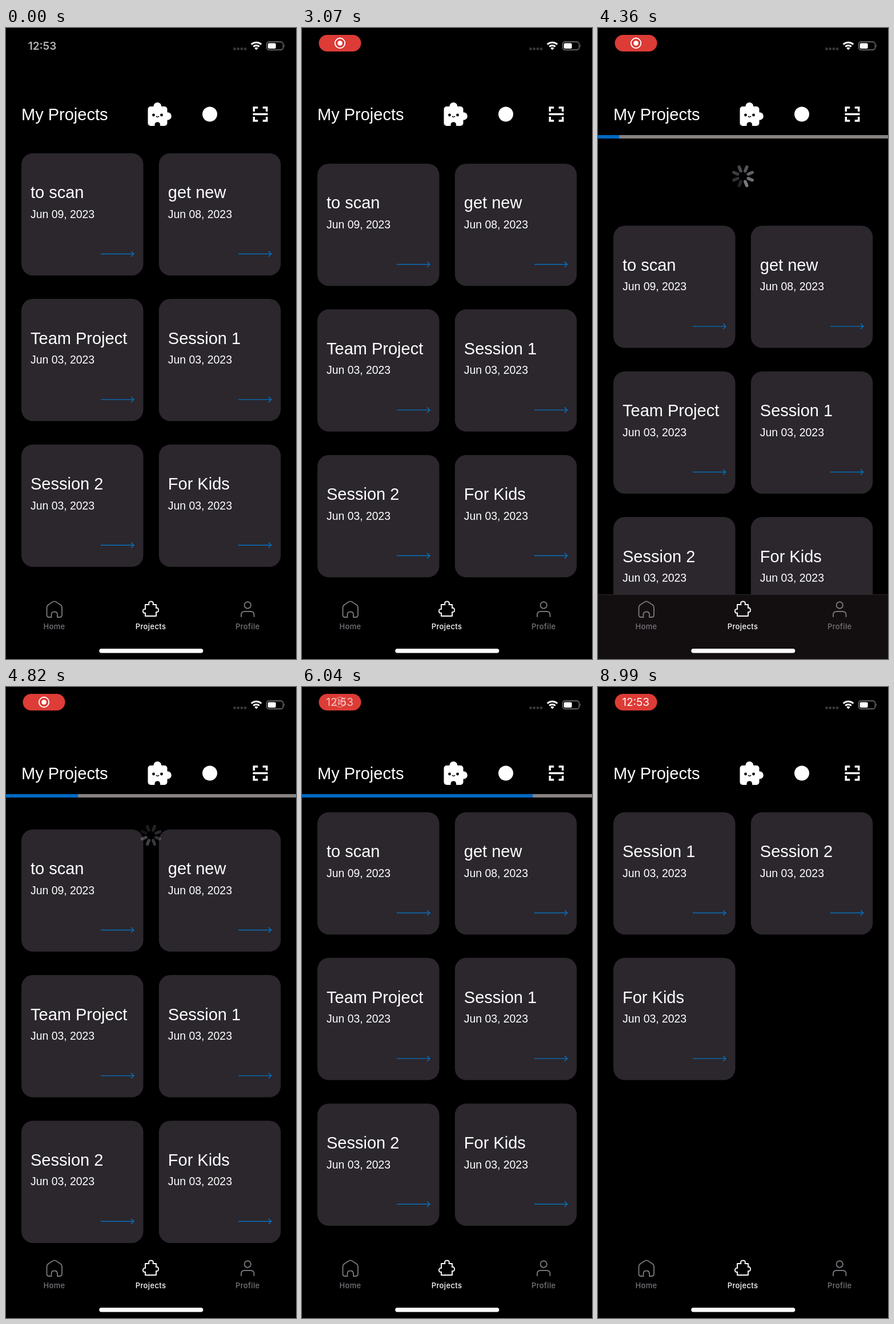
Animation, 508 px wide and 1102 px high, one loop 9.01 s. Source, as an HTML page:

```html
<!DOCTYPE html>
<html lang="en">
<head>
<meta charset="utf-8">
<title>My Projects</title>
<style>
  html, body { margin: 0; width: 100%; height: 100%; overflow: hidden; background: #000; }
  svg { display: block; width: 100%; height: 100%; }
  text { fill: #fff; font-family: "Liberation Sans", Arial, sans-serif; }
  .title { font-size: 29px; }
  .date { font-size: 19.4px; }
  .clock, .tab { font-family: Inter, sans-serif; text-anchor: middle; }
  .clock { font-size: 19px; }
  .tab { font-size: 13px; font-weight: 500; letter-spacing: .35px; }
  .line { fill: none; stroke: #fff; stroke-width: 1.9; stroke-linecap: round; stroke-linejoin: round; }
  .off { stroke: #77757b; }
  text.off { fill: #77757b; stroke: none; }
</style>
</head>
<body>
<svg viewBox="0 0 508 1102">
  <rect width="508" height="1102"/>

  <!-- status bar -->
  <text id="clock" class="clock" x="63.5" y="38" font-weight="600" style="fill:#b5b3b7">12:53</text>
  <g id="pill">
    <rect id="pillBox" x="29.5" y="12" width="74" height="29" rx="14.5"/>
    <g id="record">
      <circle class="line" cx="66.5" cy="26.5" r="8.7"/>
      <circle cx="66.5" cy="26.5" r="4.3" fill="#fff"/>
    </g>
    <text id="pillTime" class="clock" x="66.2" y="33.3">12:53</text>
  </g>
  <g fill="#39373b">
    <circle cx="400.5" cy="36.5" r="2.4"/><circle cx="406.7" cy="36.5" r="2.4"/>
    <circle cx="412.9" cy="36.5" r="2.4"/><circle cx="419.1" cy="36.5" r="2.4"/>
  </g>
  <g fill="none" stroke="#fff" stroke-width="3">
    <path d="M429.7 28.7A13 13 0 0 1 447.3 28.7M433.2 32.5A7.8 7.8 0 0 1 443.8 32.5"/>
    <path d="M438.5 38.5l-3.2-3.4A4.6 4.6 0 0 1 441.7 35.1z" fill="#fff" stroke="none"/>
  </g>
  <rect x="456.5" y="24.2" width="29" height="14" rx="4" fill="none" stroke="#7c7a7e" stroke-width="1.4"/>
  <rect x="458.7" y="26.4" width="14" height="9.6" rx="2" fill="#fff"/>
  <path d="M487 29q2 2 0 4.5z" fill="#7c7a7e"/>

  <!-- header -->
  <text class="title" x="27" y="160.5">My Projects</text>
  <g fill="#fff">
    <rect x="248.5" y="137" width="34" height="34" rx="5"/>
    <circle cx="265.3" cy="137" r="7"/>
    <circle cx="283" cy="154" r="6.8"/>
  </g>
  <path d="M260.5 172v-3a4.8 4.8 0 0 1 9.6 0v3z"/>
  <circle cx="258.5" cy="152" r="2.4"/><circle cx="272.5" cy="152" r="2.4"/>
  <path d="M263 154q2.5 3 5 0" fill="none" stroke="#000" stroke-width="1.5"/>
  <circle cx="357" cy="150.5" r="13" fill="#fff"/>
  <path d="M434.3 146v-7h7M449.7 139h7v7M456.7 155v7h-7M441.3 162h-7v-7M432.5 150.5h26"
        fill="none" stroke="#fff" stroke-width="3.5"/>

  <g id="cards"></g>
  <g id="spinner"></g>

  <g id="bar">
    <rect y="187" width="508" height="6" fill="#85827f"/>
    <rect id="fill" y="187" height="6" fill="#0068c2"/>
  </g>

  <!-- tab bar -->
  <g id="tabBack">
    <rect y="989" width="508" height="113" fill="#130f10"/>
    <rect y="989" width="508" height="1" fill="#2b282a"/>
  </g>
  <path class="line off" d="M79.5 1029H76Q71.5 1029 71.5 1025V1012.5Q71.5 1009 74.5 1007L82 1002.2Q84.7 1000.5 87.5 1002.2L95 1007Q98 1009 98 1012.5V1025Q98 1029 93.5 1029H90V1024.5Q90 1019.5 84.7 1019.5T79.5 1024.5Z"/>
  <path class="line" d="M244 1007H250.5Q249 1001.5 254 1001.5T257.500 1007H263V1013Q267 1012 267 1016.500T263 1020V1027H244V1021.500Q240 1022.500 240 1018.500T244 1015Z"/>
  <circle class="line off" cx="423.3" cy="1008" r="5.7"/>
  <path class="line off" d="M412 1028v-3q0-6 6-6h10.5q6 0 6 6v3"/>
  <text class="tab off" x="84.5" y="1050">Home</text>
  <text class="tab" x="253.5" y="1050">Projects</text>
  <text class="tab off" x="423.3" y="1050">Profile</text>
  <rect x="163.300" y="1084" width="182" height="7.400" rx="3.700" fill="#fff"/>
</svg>
<script>
const LOOP = 9010, RELOAD = 7000;
const el = id => document.getElementById(id);
const clamp = x => Math.max(0, Math.min(1, x));
const ramp = (t, a, b) => clamp((t - a) / (b - a));
const smooth = x => x * x * (3 - 2 * x);
const fade = (id, opacity) => el(id).setAttribute("opacity", opacity);

// Piecewise linear value through [time, value] points.
function along(points, t) {
  const i = points.findIndex(p => p[0] > t);
  if (i < 0) return points.at(-1)[1];
  if (!i) return points[0][1];
  const [a, v] = points[i - 1], [b, w] = points[i];
  return v + (w - v) * ramp(t, a, b);
}

const kept = [["Session 1", "03"], ["Session 2", "03"], ["For Kids", "03"]];
const all = [["to scan", "09"], ["get new", "08"], ["Team Project", "03"], ...kept];

const card = ([name, day], i) => `
  <g transform="translate(${27 + i % 2 * 240.8} ${218.7 + (i >> 1) * 254.4})">
    <rect width="213.5" height="213.5" rx="20" fill="#2b272d"/>
    <text class="title" x="16" y="78.5">${name}</text>
    <text class="date" x="16" y="113">Jun ${day}, 2023</text>
    <path d="M139 175.8h58m-5-4.8l5 4.8l-5 4.8" fill="none" stroke="#0870bd" stroke-width="1.4"/>
  </g>`;

const spokes = Array.from({ length: 8 }, (_, i) => {
  const line = document.createElementNS("http://www.w3.org/2000/svg", "path");
  line.setAttribute("d", "M0-10V-17.5");
  line.setAttribute("transform", `rotate(${i * 45})`);
  line.setAttribute("stroke", "#7d7983");
  line.setAttribute("stroke-width", 5.5);
  line.setAttribute("stroke-linecap", "round");
  el("spinner").append(line);
  return line;
});

function pull(t) {
  if (t < 4250) return 145 * smooth(ramp(t, 2920, 3600));
  if (t < 4360) return 145 - 18 * ramp(t, 4250, 4360) ** 2;
  return t < 5700 ? 127 * Math.exp((4360 - t) / 319) * (1 - ramp(t, 5300, 5700)) : 0;
}

function drawSpinner(t, offset) {
  const gone = ramp(t, 4650, 5050), spinning = t > 3800;
  const turn = 22.5 * ramp(t, 3700, 3850);
  const head = Math.floor((t - 3800) / 180);
  el("spinner").setAttribute("transform", `translate(254 259) rotate(${turn}) scale(${1 - gone * .1})`);
  fade("spinner", t > 2900 ? 1 - gone : 0);
  spokes.forEach((spoke, i) => {
    const age = spinning ? (head - i + 16) % 8 : i;
    const shown = spinning || offset > 50 + i * 10;
    spoke.setAttribute("opacity", shown ? 1 - age * .1 : 0);
  });
}

function drawStatus(t) {
  const glow = (.5 + .5 * Math.cos((t - 3680) / 1600 * 2 * Math.PI)) ** 3;
  el("pillBox").setAttribute("fill", `rgb(${220 + 33 * glow},${59 + 11 * glow},${54 + 9 * glow})`);
  const swap = ramp(t, 5850, 6120);
  fade("clock", 1 - ramp(t, 60, 200));
  fade("pill", ramp(t, 150, 350));
  fade("record", 1 - swap);
  fade("pillTime", swap);
}

function drawBar(t) {
  const u = along([[3853, 0], [4360, .174], [4820, .332], [6040, .701], [6640, .91], [6900, 1]], t);
  fade("bar", t > 3853 && t < RELOAD ? 1 : 0);
  el("fill").setAttribute("width", 254 * (1 - Math.cos(Math.PI * u)));
}

let shownList;
function drawCards(t, offset) {
  const list = t < RELOAD ? all : kept;
  if (list !== shownList) el("cards").innerHTML = list.map(card).join("");
  shownList = list;
  el("cards").setAttribute("transform", `translate(0 ${offset})`);
}

function frame() {
  const t = performance.now() % LOOP, offset = pull(t);
  drawStatus(t);
  drawCards(t, offset);
  drawSpinner(t, offset);
  drawBar(t);
  fade("tabBack", offset > 42 ? 1 : 0);
  requestAnimationFrame(frame);
}
frame();
</script>
</body>
</html>
```
